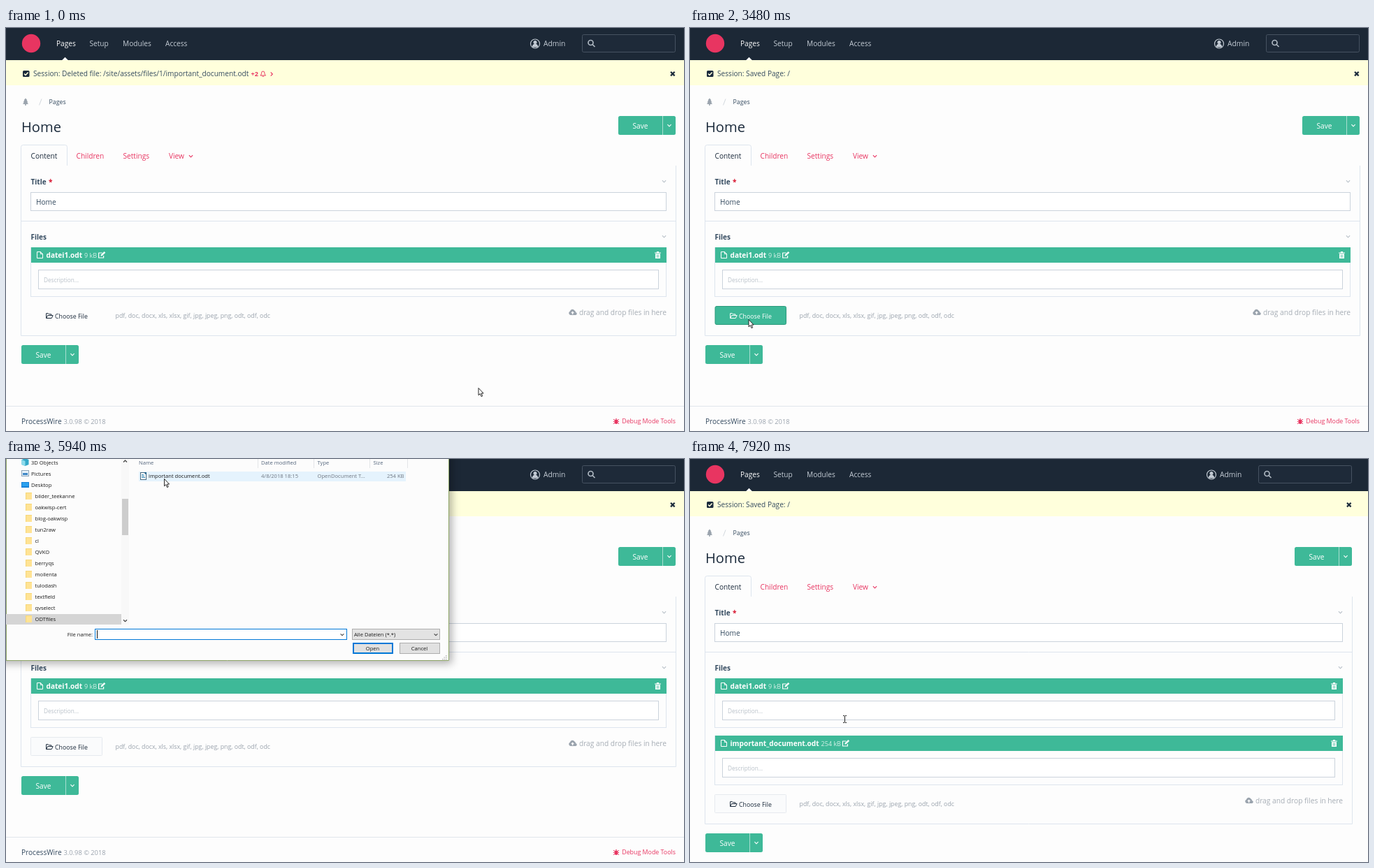
Write an HTML page with a canvas that moves like this. It is 970 px wide and 577 px high and loops after 8000 ms.

```html
<!DOCTYPE html>
<html lang="en">
<head>
<meta charset="utf-8">
<title>File upload</title>
<style>
  html, body { margin: 0; width: 100%; height: 100%; overflow: hidden; background: #fdfdfd; }
  canvas { display: block; }
</style>
</head>
<body>
<canvas id="stage" width="970" height="577"></canvas>
<script>
const LOOP = 8000;
const ctx = document.getElementById('stage').getContext('2d');
const C = {
  page: '#fdfdfd', dark: '#1c2836', ink: '#354b60', deep: '#1c2b3c', pink: '#e83561',
  green: '#3eb998', line: '#dde5ee', field: '#cbd3dc', muted: '#9aa3ad', pale: '#b9c1c9', nav: '#c3cbd4'
};

// Cursor stops: start time, shape, x, y
const CURSOR = [
  [0, 'arrow', 675.5, 515], [500, 'arrow', 335.5, 455], [1000, 'arrow', 52, 469],
  [1970, 'hand', 46, 467], [3480, 'arrow', 83.5, 417], [4450, 'arrow', 205.5, 191.5],
  [4950, 'arrow', 223.5, 66.5], [5450, 'arrow', 223.5, 33.5], [5940, 'arrow', 226, 28],
  [6440, 'hand', 222.5, 28], [6920, 'hand', 228, 19.5], [7410, 'hand', 189.5, 331.5], [7920, 'beam', 221.5, 367]
];

function text(str, x, y, size = 10.15, color = C.ink, weight = 400, align = 'left') {
  ctx.font = `${weight} ${size}px "Open Sans", "Noto Sans", sans-serif`;
  ctx.fillStyle = color;
  ctx.textAlign = align;
  ctx.fillText(str, x, y);
}

function rect(x, y, w, h, color) {
  ctx.fillStyle = color;
  ctx.fillRect(x, y, w, h);
}

function frame(x, y, w, h, color, fill) {
  if (fill) rect(x, y, w, h, fill);
  ctx.strokeStyle = color;
  ctx.lineWidth = 1;
  ctx.strokeRect(x + .5, y + .5, w - 1, h - 1);
}

function round(x, y, w, h, r, fill, stroke) {
  ctx.beginPath();
  ctx.roundRect(x, y, w, h, r);
  if (fill) { ctx.fillStyle = fill; ctx.fill(); }
  if (stroke) { ctx.strokeStyle = stroke; ctx.lineWidth = 1; ctx.stroke(); }
}

function shape(path, x, y, fill, stroke, width = 1) {
  const p = new Path2D(path);
  ctx.save();
  ctx.translate(x, y);
  ctx.lineJoin = 'round';
  if (fill) { ctx.fillStyle = fill; ctx.fill(p, 'evenodd'); }
  if (stroke) { ctx.strokeStyle = stroke; ctx.lineWidth = width; ctx.stroke(p); }
  ctx.restore();
}

function dot(x, y, r, color) {
  ctx.beginPath();
  ctx.arc(x, y, r, 0, 7);
  ctx.fillStyle = color;
  ctx.fill();
}

const down = (x, y, color, s = 2.6) =>
  shape(`M${-s} ${-s / 2}L0 ${s / 2}L${s} ${-s / 2}`, x, y, null, color, 1.1);
const right = (x, y, color) => shape('M-1.3 -2.6L1.3 0L-1.3 2.6', x, y, null, color, 1.1);
const pointer = x => shape('M-4.5 4.5L0 0L4.5 4.5Z', x, 41.8, C.page);

function gear(x, y, r, color) {
  ctx.strokeStyle = color;
  ctx.lineWidth = r * .7;
  ctx.beginPath();
  ctx.arc(x, y, r * .65, 0, 7);
  ctx.stroke();
  ctx.lineWidth = r * .4;
  for (let i = 0; i < 8; i++) {
    const a = i * Math.PI / 4;
    ctx.beginPath();
    ctx.moveTo(x + Math.cos(a) * r * .8, y + Math.sin(a) * r * .8);
    ctx.lineTo(x + Math.cos(a) * r * 1.15, y + Math.sin(a) * r * 1.15);
    ctx.stroke();
  }
}

function person(x, y, s, color) {
  dot(x, y, 1.8 * s, color);
  shape(`M${-3 * s} ${5 * s}Q${-3 * s} ${1.6 * s} 0 ${1.6 * s}T${3 * s} ${5 * s}Z`, x, y, color);
}

function saveButton(x, y, color) {
  round(x, y, 82, 27, 2.5, color);
  rect(x + 63, y, 1, 27, 'rgba(255,255,255,.55)');
  text('Save', x + 31.5, y + 17.5, 10.1, '#fff', 400, 'center');
  down(x + 73, y + 13.5, '#fff');
}

function header(sx, menu) {
  rect(0, 0, 970, 46, C.dark);
  dot(36, 22, 13.2, C.pink);
  text('Pages', 72, 26, 10.15, '#fff');
  text('Setup', 119.5, 26, 10.15, C.nav);
  text('Modules', 167, 26, 10.15, C.nav);
  text('Access', 228, 26, 10.15, C.nav);
  pointer(84.5);
  if (menu) pointer(243);

  const x = 757 - sx;
  ctx.save();
  ctx.beginPath();
  ctx.arc(x, 22.5, 6.5, 0, 7);
  ctx.strokeStyle = C.nav;
  ctx.lineWidth = 1.2;
  ctx.stroke();
  ctx.clip();
  person(x, 20.5, 1.4, C.nav);
  ctx.restore();
  text('Admin', 769 - sx, 26, 10.3, C.nav);
  round(824.5 - sx, 9.5, 133, 25, 2, '#1e2a39', '#465261');
  shape('M7 3.5A3.5 3.5 0 1 1 0 3.5A3.5 3.5 0 1 1 7 3.5M6 6L9.5 9.5', 833 - sx, 17.5, null, '#aeb7c1', 1.7);
}

function notice(sx, saved) {
  rect(0, 46, 970, 36, '#ffffdc');
  round(24, 61, 9.5, 9, 1.5, C.deep);
  shape('M2 4.5L4 6.5L7.6 2.6', 24, 61, null, '#ffffdc', 1.5);
  if (saved) {
    text('Session: Saved Page: /', 39, 69);
  } else {
    text('Session: Deleted file: /site/assets/files/1/important_document.odt', 39, 69);
    text('+2', 350.5, 69, 9, C.pink, 700);
    shape('M.5 7Q2 5.5 2 3.5Q2 1 4.2 1T6.4 3.5Q6.4 5.5 8 7ZM3.3 8.3H5.2', 363.5, 61, null, C.pink);
    right(380, 66, C.pink);
  }
  shape('M0 0L5.6 5.6M5.6 0L0 5.6', 951 - sx, 62.8, null, C.deep, 2.2);
}

function fileItem(y, sx, name, size, nameWidth) {
  const w = 909 - sx;
  frame(35, y, w + 1, 71, C.line);
  rect(36, y, w, 22, C.green);
  shape('M.5 .5H5.5L8.5 3.5V9.5H.5ZM5.5 .5V3.5H8.5', 44, y + 6, null, '#fff');
  text(name, 57.5, y + 15, 10.1, '#fff', 700);
  const sizeX = 57.5 + nameWidth(name);
  text(size, sizeX + 3, y + 15, 9, '#d5f1e8');
  const editX = sizeX + 5 + ctx.measureText(size).width;
  shape('M7.5 5.5V8.5H.5V1.5H5.5', editX, y + 6.5, null, '#fff', 1.2);
  shape('M3.4 6L3.8 4L8.4 -.6L10.2 1.2L5.4 5.7Z', editX, y + 6.5, '#fff');
  shape('M0 1.5H2.5L3.2 0H5.8L6.5 1.5H9V2.5H0ZM1 3.2H8V10H1ZM2.7 4.5V8.7H3.3V4.5ZM4.2 4.5V8.7H4.8V4.5ZM5.7 4.5V8.7H6.3V4.5Z', 928 - sx, y + 6, '#fff');
  frame(46, y + 32, 888 - sx, 28, C.field, '#fff');
  text('Description...', 54, y + 49.5, 8.2, C.pale);
}

function boldWidth(str) {
  ctx.font = '700 10.1px "Open Sans", "Noto Sans", sans-serif';
  return ctx.measureText(str).width;
}

function chooser(y, mode) {
  const hover = mode === 'hover';
  if (hover) round(36, y + .5, 101.5, 26, 2, C.green, '#2c9a7c');
  if (mode === 'plain') round(35.5, y + .5, 102, 26, 1, '#fafbfc', '#e6eaef');
  const color = hover ? '#fff' : C.deep;
  shape('M.6 7.5V.6H3.4L4.5 1.8H7.8V3.6M.6 7.5L2.6 3.6H10.2L8.2 7.5Z', 57, y + 10, null, color);
  text('Choose File', 70, y + 17.5, 8.8, color);
}

function page(s) {
  const { sx, grow } = s;
  rect(0, 0, 970, 577, C.page);
  header(sx, s.menu);
  notice(sx, s.saved);

  shape('M3.5 0L6 3H5L7 6H5.6L7.5 8.5H4.3V10.5H2.7V8.5H-.5L1.4 6H0L2 3H1Z', 24.5, 100.5, C.muted);
  shape('M0 9L3.5 0', 47.5, 101.5, null, '#d3d8de');
  text('Pages', 61.5, 109, 8.8);
  text('Home', 22, 149, 20.1, C.deep);
  saveButton(876 - sx, 126, C.green);

  const bottom = 440.5 + grow, edge = 958.5 - sx;
  shape(`M21.5 ${bottom}V170.5Q21.5 167.5 24.5 167.5H84.5Q87.5 167.5 87.5 170.5V197M${edge} 197V${bottom}H21.5M21.5 276.5H${edge}`, 0, 0, null, C.line);
  text('Content', 35.5, 187, 10.15, C.deep);
  text('Children', 100.5, 187, 10.15, C.pink);
  text('Settings', 167.5, 187, 10.15, C.pink);
  text('View', 233, 187, 10.15, C.pink);
  down(264.5, 183.5, C.pink);

  text('Title', 35.5, 223.5, 10, C.ink, 700);
  text('*', 61, 224, 10, '#d8152f', 700);
  down(941.5 - sx, 219.5, C.pale);
  frame(35, 235, 910 - sx, 27, C.field, '#fff');
  text('Home', 43, 252.5);

  text('Files', 35.5, 302.5, 10, C.ink, 700);
  down(941.5 - sx, 298.5, C.pale);
  fileItem(314, sx, 'datei1.odt', '9 kB', boldWidth);
  if (grow) {
    ctx.save();
    ctx.beginPath();
    ctx.rect(0, 396, 970, grow - 11);
    ctx.clip();
    fileItem(396, sx, 'important_document.odt', '254 kB', boldWidth);
    ctx.restore();
  }

  chooser(398 + grow, s.choose);
  text('pdf, doc, docx, xls, xlsx, gif, jpg, jpeg, png, odt, odf, odc', 156.5, 414.5 + grow, 8.8, C.muted);
  shape('M2.8 9A2.8 2.8 0 0 1 2 3.6A3.4 3.4 0 0 1 8.4 2.6A2.4 2.4 0 0 1 10 5A2 2 0 0 1 9.5 9ZM5.6 3.6L3.2 6H4.8V8H6.4V6H8Z', 805 - sx, 402 + grow, C.muted);
  text('drag and drop files in here', 945 - sx, 410.5 + grow, 10.2, '#a6adb5', 400, 'right');
  saveButton(22, 454 + grow, s.hot ? C.pink : C.green);

  rect(0, 541 + grow, 970, 1, '#e1e6ec');
  text('ProcessWire', 22, 567 + grow, 10.1);
  text('3.0.98 © 2018', 82.5, 567 + grow, 9.3, C.muted);
  shape('M2 3H6V8Q4 10 2 8ZM2.4 2.4Q4 -.6 5.6 2.4Z', 869, 558 + grow, C.pink);
  shape('M0 2L2 4M8 2L6 4M0 5.5H8M0 9L2 7M8 9L6 7', 869, 558 + grow, null, C.pink);
  text('Debug Mode Tools', 958, 566 + grow, 8.85, C.pink, 400, 'right');
}

function accessMenu() {
  frame(218, 46, 136, 85, C.line, C.page);
  pointer(243);
  ['Users', 'Roles', 'Permissions'].forEach((name, i) => {
    const y = 66.5 + i * 23.5;
    text(name, 242.5, y + 3.5, 8.6);
    right(340, y, C.pale);
  });
  person(231, 64.5, .8, C.muted);
  person(237, 64.5, .8, C.muted);
  person(234, 64.5, 1.1, C.muted);
  gear(232, 90.5, 2.8, C.muted);
  gear(237, 88, 1.5, C.muted);
  gear(237, 92.5, 1.5, C.muted);
  gear(234, 113.5, 3.8, C.muted);
}

function dialog(rowHover, caret) {
  const small = (str, x, y, color = '#1a1a1a', align) => text(str, x, y, 7.6, color, 400, align);
  const gray = '#6f7680', head = '#54657c', blue = '#0078d7';

  ctx.save();
  ctx.shadowColor = 'rgba(0,0,0,.3)';
  ctx.shadowBlur = 11;
  ctx.shadowOffsetX = ctx.shadowOffsetY = 4;
  rect(-20, -20, 654, 309, '#fcfcfc');
  ctx.restore();
  shape('M0 288.5H633.5V0M.5 0V288', 0, 0, null, '#8fa668');

  // Folder tree
  rect(0, 222, 165, 15, '#d5d5d5');
  rect(165, 0, 11, 237, '#f8f8f8');
  rect(166, 57, 9, 52, '#cdcdcd');
  shape('M-2.5 1.5L0 -1L2.5 1.5', 170.5, 3, null, '#444', 1.2);
  down(170.5, 231.5, '#444', 2.5);
  shape('M0 1L5 -1L10 1V8L5 10L0 8Z', 22.5, 0, '#35a9c9');
  shape('M0 1L5 3V10L0 8Z', 22.5, 0, '#8edcec');
  frame(22, 16, 11, 9, '#8aa3b8', '#e8f3fb');
  rect(24, 20, 7, 3, '#3d86c6');
  rect(22, 33, 11, 8, '#1681d8');
  rect(23, 34, 9, 5, '#2ba1ee');
  ['3D Objects', 'Pictures', 'Desktop'].forEach((name, i) => small(name, 36, 7.7 + i * 16.1));
  ['bilder_teekanne', 'oakwisp-cert', 'blog-oakwisp', 'tun2raw', 'cl', 'QVKO', 'berryqs',
    'mollenta', 'tulodash', 'textfield', 'qvselect', 'ODTfiles'].forEach((name, i) => {
    const y = 55.5 + i * 16.07;
    rect(28, Math.round(y) - 8, 9, 10, '#f7d778');
    rect(29, Math.round(y) - 7, 8, 9, '#ffe394');
    small(name, 41.5, y);
  });

  // File list
  if (rowHover) rect(190, 18, 382, 14, '#e5f3fd');
  [['Name', 190], ['Date modified', 365], ['Type', 445.5], ['Size', 525.5]].forEach(([s, x]) => small(s, x, 8, head));
  for (const x of [360, 440, 520, 574]) rect(x, 0, 1, 13, '#e3e5e8');
  frame(192, 19, 9, 11, '#4b6a80', '#fff');
  shape('M2 3H5M2 5H6M2 7H7', 192, 19.5, null, '#2f87b7');
  shape('M5 0H9V4Z', 192, 19, '#1f5f86');
  small('important document.odt', 204, 27.3);
  small('4/8/2018 18:15', 365, 27.3, gray);
  small('OpenDocument T...', 445.5, 27.3, gray);
  small('254 KB', 569.5, 27.3, gray, 'right');

  // Name field and buttons
  small('File name:', 124, 254, '#1a1a1a', 'right');
  frame(127, 243, 361, 16, blue, '#fff');
  down(481, 251.5, '#444', 2.4);
  if (caret) rect(130, 245, 1, 12, '#111');
  frame(495, 243, 126, 16, '#adadad', '#e3e3e3');
  small('Alle Dateien (*.*)', 498, 254);
  down(615, 251.5, '#444', 2.4);
  frame(496, 263, 58, 16, blue, '#e1e1e1');
  frame(497, 264, 56, 14, blue);
  small('Open', 524.5, 273.7, '#1a1a1a', 'center');
  frame(563, 263, 58, 16, '#adadad', '#e1e1e1');
  small('Cancel', 591.5, 273.7, '#1a1a1a', 'center');
  for (let i = 0; i < 3; i++)
    for (let j = 0; j <= i; j++) rect(629 - j * 2.5, 281 + i * 2.5, 1.4, 1.4, '#b5b5b5');
}

function cursor(kind, x, y) {
  if (kind === 'arrow')
    shape('M.5 .5V10.8L2.8 8.6L4.5 12.6L6.2 11.9L4.5 8H7.6Z', x, y, '#fff', '#111', .9);
  else if (kind === 'hand')
    shape('M3.2 9V1.6Q3.2 .5 4.2 .5T5.3 1.6V5.6Q6.4 4.8 7.2 6Q8.4 5.4 9 6.6Q10.6 6.2 10.6 7.8V10.5Q10.6 12 9.6 13V15H4.3V13.3L.8 9.2Q.2 8 1.4 7.6Z', x, y, '#fff', '#111', .9);
  else
    shape('M-2.5 .5H-.8L0 1.2L.8 .5H2.5M0 1V10M-2.5 10.5H-.8L0 9.8L.8 10.5H2.5', x, y, null, '#222');
}

function draw(t) {
  const within = (a, b) => t >= a && t < b;
  const state = {
    saved: t >= 1970,
    hot: within(1490, 3480),
    choose: within(3480, 3960) ? 'hover' : within(3960, 6440) || t >= 6920 ? 'plain' : 'bare',
    grow: t < 6440 ? 0 : t < 6920 ? 21 : 82,
    sx: t < 6920 ? 0 : 11,
    menu: within(6440, 7410)
  };
  page(state);
  if (state.menu) accessMenu();
  if (within(3960, 6440)) dialog(t >= 5940, !within(4450, 4950) && !within(5450, 5940));
  const [, kind, x, y] = CURSOR.findLast(stop => stop[0] <= t);
  cursor(kind, x, y);
}

const start = performance.now();
function tick() {
  draw((performance.now() - start) % LOOP);
  requestAnimationFrame(tick);
}
tick();
</script>
</body>
</html>
```
